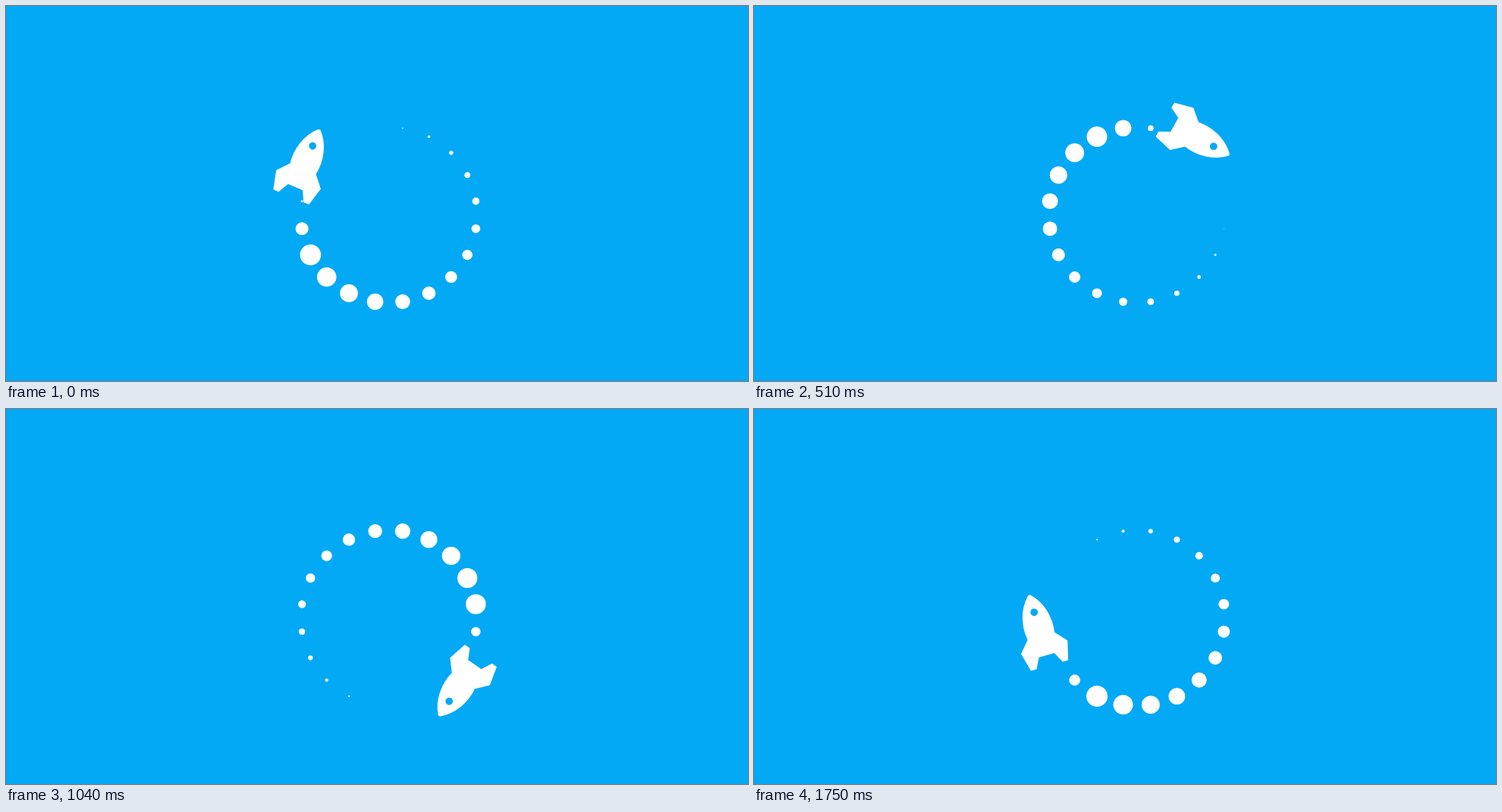
These frames come from a looping animation (978x495 px, 1830 ms). An HTML page with a canvas:

```html
<!DOCTYPE html>
<html lang="en">
<head>
<meta charset="utf-8">
<title>Rocket loader</title>
<style>
  html, body { margin: 0; width: 100%; height: 100%; overflow: hidden; background: #03a9f4; }
  canvas { display: block; }
</style>
</head>
<body>
<canvas id="stage" width="978" height="495"></canvas>
<script>
const ctx = document.getElementById('stage').getContext('2d');
const BLUE = '#03a9f4', WHITE = '#fff';
const LOOP = 1830, POSES = 24;
const CENTER = { x: 504.7, y: 275.8 };
const RING = 116, DOTS = 20, DOT_MAX = 14;
const ORBIT = 128;

const rad = deg => deg * Math.PI / 180;

// The picture holds each pose; the first few poses are a little shorter.
const poseAt = t => Math.min(Math.floor(t / 68), Math.floor((t + 48) / 77.5), POSES - 1);

// Clockwise degrees, 0 at the top of the ring: a turn in two seconds,
// in ticks of 3 degrees (1/60 s), with 4.7 ticks to a pose.
const headingOf = pose => 292.8 + 3 * Math.trunc(4.7 * pose - 0.9);

// Grows during 10% of a turn, shrinks during the next 70%.
function dotRadius(lag) {
  const p = (((lag - 9.9) % 360 + 360) % 360) / 360;
  if (p < 0.1) return DOT_MAX * p / 0.1;
  return DOT_MAX * Math.max(0, (0.8 - p) / 0.7);
}

function disc(x, y, r, color) {
  ctx.fillStyle = color;
  ctx.beginPath();
  ctx.arc(x, y, r, 0, 2 * Math.PI);
  ctx.fill();
}

function drawDots(heading) {
  for (let i = 0; i < DOTS; i++) {
    const angle = 9 + i * 360 / DOTS;
    const r = dotRadius(heading - angle);
    if (r > 0.3) disc(RING * Math.sin(rad(angle)), -RING * Math.cos(rad(angle)), r, WHITE);
  }
}

// Nose to the right; the two sides mirror each other.
function rocketPath() {
  const p = new Path2D();
  for (const side of [-1, 1]) {
    p.moveTo(67.6, 0);
    p.lineTo(67.6, side);
    p.bezierCurveTo(53.5, side * 15.8, 31, side * 20.9, 12, side * 17.6);
    p.lineTo(-3.2, side * 31);
    p.lineTo(-27.4, side * 24.9);
    p.lineTo(-27.4, side * 18.4);
    p.lineTo(-13.2, side * 11);
    p.lineTo(-13.2, 0);
    p.closePath();
  }
  return p;
}

const ROCKET = rocketPath();

function drawRocket(heading) {
  ctx.save();
  ctx.rotate(rad(heading));
  ctx.translate(0, -ORBIT);
  ctx.fillStyle = ctx.strokeStyle = WHITE;
  ctx.lineWidth = 1.6;
  ctx.lineJoin = 'round';
  ctx.fill(ROCKET);
  ctx.stroke(ROCKET);
  disc(45, 0, 4.9, BLUE);
  ctx.restore();
}

function draw(time) {
  const heading = headingOf(poseAt(time % LOOP));
  ctx.fillStyle = BLUE;
  ctx.fillRect(0, 0, 978, 495);
  ctx.save();
  ctx.translate(CENTER.x, CENTER.y);
  drawDots(heading);
  drawRocket(heading);
  ctx.restore();
}

const start = performance.now();
function loop() {
  draw(Math.max(0, performance.now() - start));
  requestAnimationFrame(loop);
}
loop();
</script>
</body>
</html>
```
